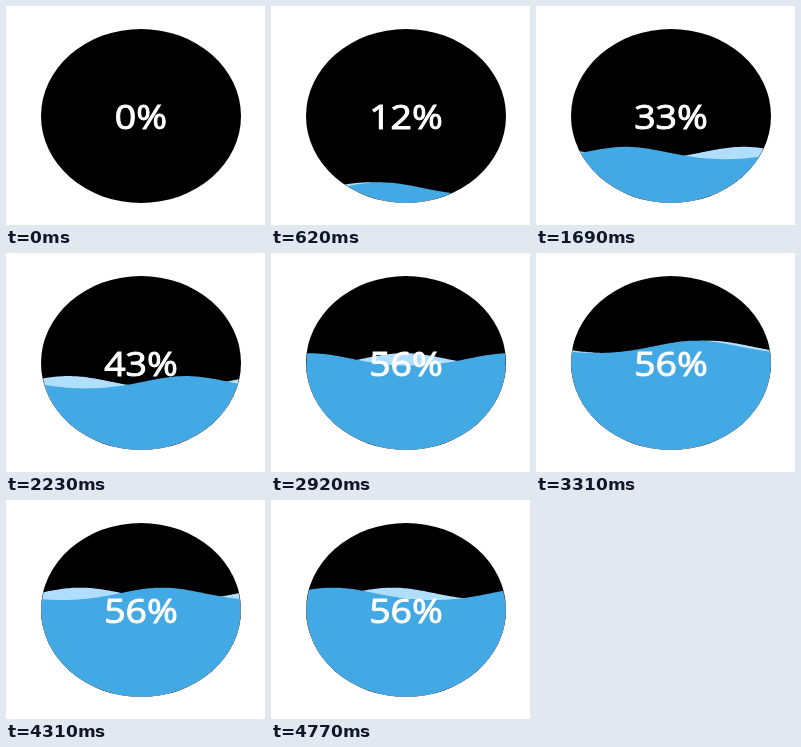
Write an HTML page that moves like this. It is 259 by 219 pixels and loops after 4840 ms.

```html
<!DOCTYPE html>
<html lang="en">
<head>
<meta charset="utf-8">
<title>Filling gauge</title>
<style>
  html, body { margin: 0; width: 100%; height: 100%; overflow: hidden; background: #fff; }
  svg { display: block; width: 259px; height: 219px; }
  text {
    font: 37.5px "Open Sans", "Noto Sans", sans-serif;
    fill: #fff; stroke: #fff; stroke-width: 1.1px; text-anchor: middle;
  }
</style>
</head>
<body>
<svg viewBox="0 0 259 219">
  <defs>
    <clipPath id="disc"><circle r="99.6"/></clipPath>
  </defs>
  <g transform="translate(135 110) scale(1 .87)">
    <circle r="100"/>
    <g clip-path="url(#disc)">
      <path id="back" fill="#b0defe"/>
      <path id="front" fill="#42a9e4"/>
    </g>
    <text id="label" y="15.5">0%</text>
  </g>
</svg>
<script>
  const LOOP = 4840, STEP = 76.9, WIDTH = 200, PERIOD = 980, GOAL = 56;
  const [back, front, label] = ['back', 'front', 'label'].map(id => document.getElementById(id));

  // Water outline: crest at x = crest, bottom of the trough at y = level.
  function wave(crest, level) {
    let d = 'M-102 102';
    for (let x = -102; x <= 102; x += 2) {
      const a = (x - crest) / WIDTH * 2 * Math.PI;
      const y = level - 7.1 * (1 + Math.cos(a)) + 0.57 * (1 - Math.cos(2 * a));
      d += `L${x} ${y.toFixed(2)}`;
    }
    return d + 'L102 102Z';
  }

  function draw(ms) {
    const t = Math.floor((ms % LOOP + 4) / STEP) * STEP;
    const level = (Math.max(100, 209 - 0.033 * t) - 110) / 0.87;
    const shift = t / PERIOD * WIDTH;
    front.setAttribute('d', t ? wave(-100 - shift, level) : '');
    back.setAttribute('d', t ? wave(-100 + shift / 2, level) : '');
    label.textContent = Math.min(GOAL, Math.floor(t / 51)) + '%';
  }

  const start = performance.now();
  function tick(now) {
    draw(Math.max(0, now - start));
    requestAnimationFrame(tick);
  }
  draw(0);
  requestAnimationFrame(tick);
</script>
</body>
</html>
```
